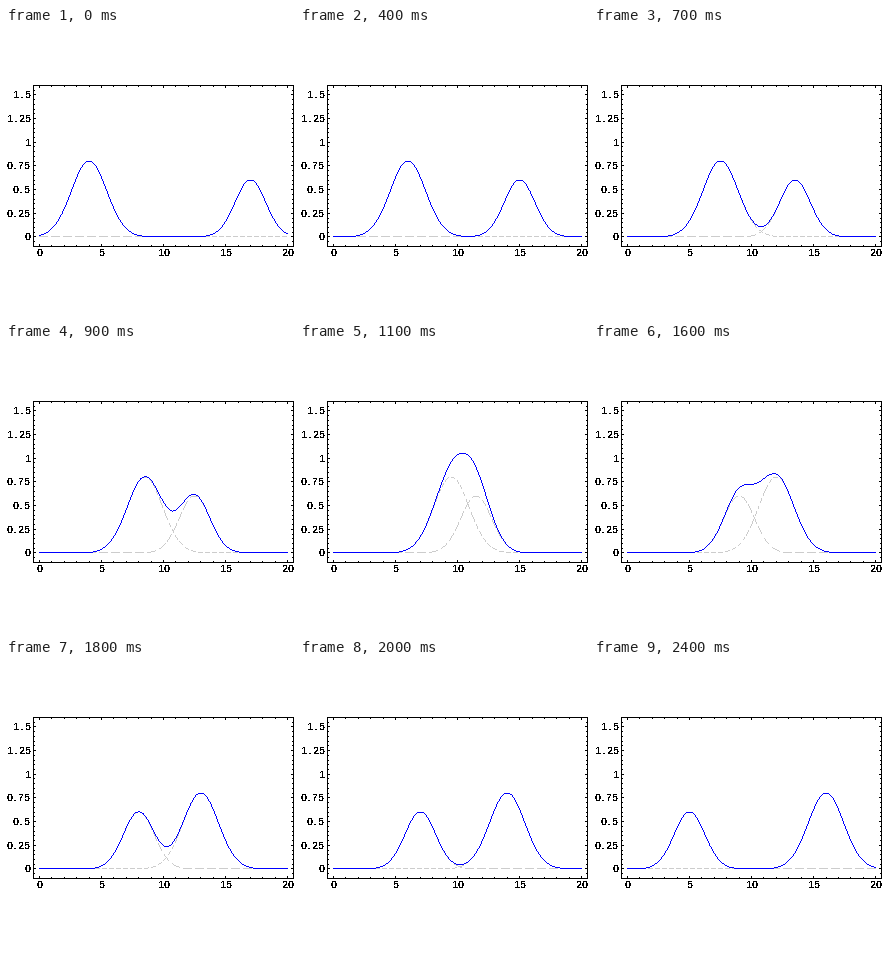
Animation of 288x288 px, one loop 2500 ms. Source, as a matplotlib script:

```python
import matplotlib.pyplot as plt
import numpy as np
from matplotlib.animation import FuncAnimation

SIZE = 288
FRAMES = 25
LEFT, RIGHT, TOP, BOTTOM = 27, 287, 57, 218

# 72 dpi makes one point equal one pixel
fig = plt.figure(figsize=(SIZE / 72, SIZE / 72), dpi=72, facecolor="white")
ax = fig.add_axes([0, 0, 1, 1])
ax.set_xlim(0, SIZE)
ax.set_ylim(SIZE, 0)
ax.axis("off")


def px(x):
    return 33.5 + 12.407 * x


def py(y):
    return 208.95 - 94.7 * y


def stroke(xs, ys):
    ax.plot(xs, ys, color="black", lw=1, antialiased=False, snap=False,
            solid_capstyle="butt")


def label(x, y, text, align):
    # the letter O gives a plain zero without an inner dot
    ax.text(x, y, text.replace("0", "O"), ha=align, va="baseline",
            family="Liberation Mono", weight="bold", size=10,
            antialiased=False)


def draw_frame():
    for y in (TOP, BOTTOM):
        stroke([LEFT, RIGHT + 1], [y + 0.5] * 2)
    for x in (LEFT, RIGHT):
        stroke([x + 0.5] * 2, [TOP, BOTTOM + 1])

    for i in range(21):
        x = np.floor(px(i)) + 0.5
        size = 2 if i % 5 == 0 else 1
        stroke([x, x], [TOP + 1, TOP + 1 + size])
        stroke([x, x], [BOTTOM - size, BOTTOM])
        if i % 5 == 0:
            label(px(i) + 0.5, 228, str(i), "center")

    for i in range(-1, 32):
        row = np.floor(py(i * 0.05))
        size = 2 if i % 5 == 0 else 1
        stroke([LEFT + 1, LEFT + 1 + size], [row + 0.5] * 2)
        stroke([RIGHT - size, RIGHT], [row + 0.5] * 2)
        if i >= 0 and i % 5 == 0:
            label(25, row + 4, f"{i * 0.05:.3g}", "right")


# Curves are crisp one-pixel lines, built from one upright bar per column
edges = np.arange(33, 283)
columns = edges[:-1] + 0.5
x = (edges - px(0)) / (px(1) - px(0))


def curve(color):
    bars = ax.vlines([], [], [], colors=color, lw=1, antialiased=False)
    bars.set_capstyle("butt")
    bars.set_snap(False)
    return bars


def set_curve(bars, y, dash=None):
    y = py(y)
    rows = np.floor(y)
    top = np.minimum(rows[:-1], rows[1:])
    end = np.maximum(np.maximum(rows[:-1], rows[1:]), top + 1)
    segs = np.stack([np.column_stack([columns, top]),
                     np.column_stack([columns, end])], axis=1)
    if dash:
        on, off = dash
        length = np.cumsum(np.hypot(1, np.diff(y))) - 1
        segs = segs[length % (on + off) < on]
    bars.set_segments(segs)


draw_frame()
big_line = curve("#cccccc")
small_line = curve("#cccccc")
sum_line = curve("blue")


def update(i):
    shift = 0.5 * i
    big = 0.8 * np.exp(-(x - 4 - shift) ** 2 / 4)
    small = 0.6 * np.exp(-(x - 17 + shift) ** 2 / 3)
    set_curve(big_line, big, (5, 2))
    set_curve(small_line, small, (9, 3))
    set_curve(sum_line, big + small)
    return big_line, small_line, sum_line


anim = FuncAnimation(fig, update, frames=FRAMES, interval=100,
                     repeat=True, repeat_delay=0)
plt.show()
```
